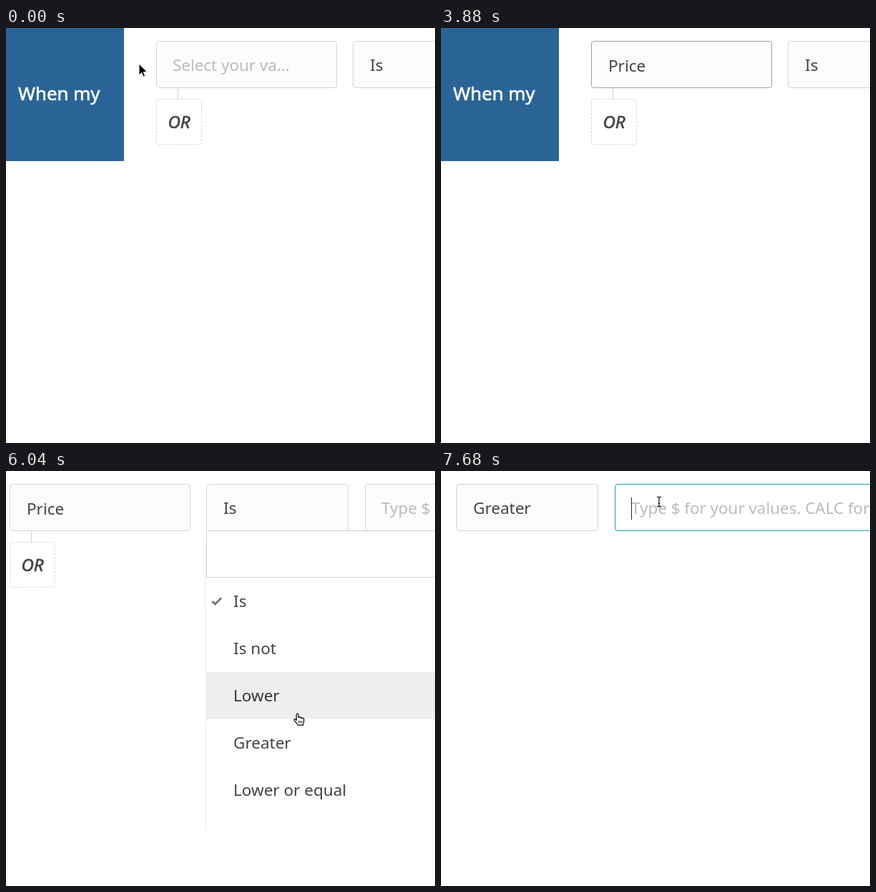
Animation, 600 px wide and 580 px high, one loop 8 s. Source, as an HTML page:

```html
<!DOCTYPE html>
<html lang="en">
<head>
<meta charset="utf-8">
<style>
  html, body { margin: 0; width: 100%; height: 100%; overflow: hidden; background: #fff; }
  #stage { position: absolute; width: 600px; height: 580px; overflow: hidden; color: #444;
    font: 22.5px/66px "Noto Sans", "Open Sans", sans-serif; white-space: nowrap; }
  #stage div, #stage svg { position: absolute; box-sizing: border-box; }
  #row { width: 1800px; height: 580px; }
  #panel { width: 165px; height: 186px; background: #2a6496; color: #fff;
    font-size: 25.8px; -webkit-text-stroke: .6px; line-height: 183px; padding-left: 17px; }
  #link { left: 240px; top: 84px; width: 1px; height: 16px; background: #d2d2d2; }
  #or { left: 210px; top: 99px; width: 64px; height: 64px; border: 1px dashed #d8d8d8;
    border-radius: 4px; text-align: center; line-height: 62px; font-size: 24px; font-style: italic;
    -webkit-text-stroke: .7px; }
  .field { top: 18px; height: 66px; border: 1px solid #d5d5d5; border-radius: 4px;
    background: #fcfcfc; line-height: 66px; padding-left: 23px; }
  .field.open { border-radius: 4px 4px 0 0; }
  .field.hint { color: #bbb; font-size: 22.4px; padding-left: 22px; }
  #one { left: 210px; width: 253px; }
  #two { left: 485px; width: 199px; }
  #three { left: 707px; width: 900px; }
  #clip { width: 1800px; height: 186px; overflow: hidden; }
  #shade { top: 101px; width: 375px; height: 400px; box-shadow: 0 0 6px rgba(0, 0, 0, .1); }
  #drop { top: 83px; width: 375px; }
  #search { width: 375px; height: 66px; border: 1px solid #d0d0d0; background: #fff; font-size: 25px;
    padding-left: 22px; display: flex; align-items: center; z-index: 1; }
  .caret { width: 1px; height: 34px; background: #222; }
  #list { left: -1px; top: 66px; width: 376px; overflow: hidden; border: 1px solid #eee;
    border-top: 0; border-radius: 0 0 4px 4px; background: #fff; }
  .item { width: 375px; height: 66px; padding-left: 38px; }
  .item.on { background: #eee; color: #333; }
  .item svg { left: 7px; top: 26px; }
  #track { left: 360px; top: 0; width: 14px; height: 361px; border-left: 1px solid #eee; background: #fff; }
  #thumb { left: 3px; top: 3px; width: 8px; height: 97px; border-radius: 4px; background: #c1c1c1; }
  #focus { left: 22px; top: 18px; height: 31px; }
</style>
</head>
<body>
<div id="stage">
  <div id="row">
    <div id="panel">When my</div>
    <div id="link"></div>
    <div id="or">OR</div>
    <div id="one" class="field"></div>
    <div id="two" class="field"></div>
    <div id="three" class="field hint">Type $ for your values. CALC for formulas<div id="focus" class="caret"></div></div>
    <div id="clip"><div id="shade"></div></div>
    <div id="drop">
      <div id="search"><span id="typed"></span><i id="caret" class="caret"></i></div>
      <div id="list"></div>
    </div>
  </div>
  <svg id="cursor" width="1" height="1" overflow="visible">
    <path id="arrow" d="M0 0v16l3.7-3.4 2.5 5.6 2.5-1.1-2.4-5.5h5.1z" stroke="#fff"/>
    <g id="hand" transform="translate(-5 -1)" stroke="#000" stroke-width="1.2">
      <path fill="#fff" d="M4.2 10V2.4a1.4 1.4 0 0 1 2.8 0V7a1.3 1.3 0 0 1 2.6 0v.5a1.3 1.3 0 0 1 2.5.3v.5a1.2 1.2 0 0 1 2.5.4v3.2c0 2-1.2 2.6-1.2 5.3H6c-.3-2-3-4-4.7-6.6C.4 8.6 2 7.6 4.2 10Z"/>
      <path d="M7.6 11v3.4M9.7 11v3.4M11.8 11v3.4" stroke-width=".9"/>
    </g>
    <path id="beam" d="M-3-7q3 0 3 2v10q0 2-3 2M3-7q-3 0-3 2v10q0 2 3 2M-1.5 2h3" fill="none" stroke="#111" stroke-width="1.2"/>
  </svg>
</div>
<script>
const LOOP = 8000;
const $ = id => document.getElementById(id);
const clamp = u => Math.max(0, Math.min(1, u));
const smooth = u => u * u * (3 - 2 * u);
const glide = u => 1 - (1 - clamp(u) ** 2.1) ** 5;   // scroll with a long tail
const within = (t, a, b) => t >= a && t < b;

const FIELDS = ["Select your value", "ean", "name", "size", "brand", "price"];
const MATCHES = ["price", "sale price"];
const TESTS = ["Is", "Is not", "Lower", "Greater", "Lower or equal", "Greater or equal"];
const KEYS = [[2320, "p"], [2480, "r"], [2600, "i"]];
const CHECK = '<svg width="16" height="14"><path d="M1.5 7l4 4L14 2.5" fill="none" stroke="#777" stroke-width="3"/></svg>';

// start, end, from x, y, to x, y, shown until
const MOVES = [
  [200, 1000, 186, 50, 431, 47, 1760],
  [1760, 2240, 431, 47, 419, 168, 2320],
  [3480, 3680, 419, 168, 419, 187, 3840],
  [4600, 4800, 440, 130, 450, 73, 5240],
  [5240, 6040, 450, 73, 407, 339, 6080],
  [6080, 6360, 407, 339, 408, 396, 6800],
  [7240, 7560, 340, 170, 305, 43, LOOP]
];

function pointer(t) {
  const [a, b, x0, y0, x1, y1, end] = MOVES.findLast(m => t >= m[0]) || MOVES[0];
  const k = smooth(clamp((t - a) / (b - a)));
  return { x: x0 + (x1 - x0) * k, y: y0 + (y1 - y0) * k, shown: t < end };
}

function setHTML(el, html) {
  if (el.cache !== html) el.innerHTML = el.cache = html;
}

function drawField(el, text, hint, open, gray) {
  setHTML(el, text);
  el.classList.toggle("hint", hint);
  el.classList.toggle("open", open);
  el.style.borderColor = `rgb(${gray},${gray},${gray})`;
}

function drawDrop(t, first, y) {
  const found = first && t >= 2760;
  const items = !first ? TESTS : found ? MATCHES : FIELDS;
  const left = first ? 210 : 485;
  const hover = Math.floor((y - 149) / 66);
  $("drop").style.left = $("shade").style.left = left + "px";
  $("shade").style.height = found ? "180px" : "400px";
  const list = $("list");
  list.style.height = (!first ? 355 : found ? 132 : 361) + "px";
  list.style.borderBottomWidth = first ? "1px" : 0;
  setHTML(list, items.map((name, i) =>
    `<div class="item${i === hover ? " on" : ""}" style="top:${i * 66}px">${i || found ? "" : CHECK}${name}</div>`
  ).join("") + (first && !found ? '<div id="track"><div id="thumb"></div></div>' : ""));
  $("typed").textContent = first ? KEYS.filter(k => t >= k[0]).map(k => k[1]).join("") : "";
  const lit = first ? t < 3480 : (t - 5080) % 1000 < 490;
  $("caret").style.visibility = lit ? "visible" : "hidden";
}

function drawCursor(t, p, open) {
  let kind = "hand";
  if (open && within(p.y, 84, 149) || t > 7200 && p.y < 84) kind = "beam";
  else if (p.x < 210 || !open && p.y > 84) kind = "arrow";
  for (const id of ["arrow", "hand", "beam"]) $(id).style.display = id === kind ? "" : "none";
  const c = $("cursor");
  c.style.display = p.shown ? "" : "none";
  c.style.left = Math.round(p.x) + "px";
  c.style.top = Math.round(p.y) + "px";
}

function draw(t) {
  const first = within(t, 1080, 3840), second = within(t, 5080, 6800);
  const open = first || second;
  const p = pointer(t);
  const scroll = 205 * glide((t - 4280) / 680) + 259 * glide((t - 6880) / 720);
  $("row").style.transform = `translateX(${-Math.round(scroll * 2) / 2}px)`;

  const picked = t >= 3840;
  const fade = Math.round(160 + 53 * clamp((t - 5200) / 280));
  drawField($("one"), picked ? '<span style="position:relative;top:1px">Price</span>' : "Select your va...",
    !picked, first, picked ? fade : 213);
  drawField($("two"), t < 6800 ? "Is" : "Greater", false, second, within(t, 6800, 7640) ? 160 : 213);

  const typing = t >= 7640;
  $("three").style.borderColor = typing ? "#1ba3b0" : "";
  $("three").style.background = typing ? "#fff" : "";
  $("focus").style.display = typing ? "" : "none";

  $("drop").style.display = $("clip").style.display = open ? "" : "none";
  if (open) drawDrop(t, first, p.y);
  drawCursor(t, p, open);
}

function tick() {
  draw(performance.now() % LOOP);
  requestAnimationFrame(tick);
}
tick();
</script>
</body>
</html>
```
